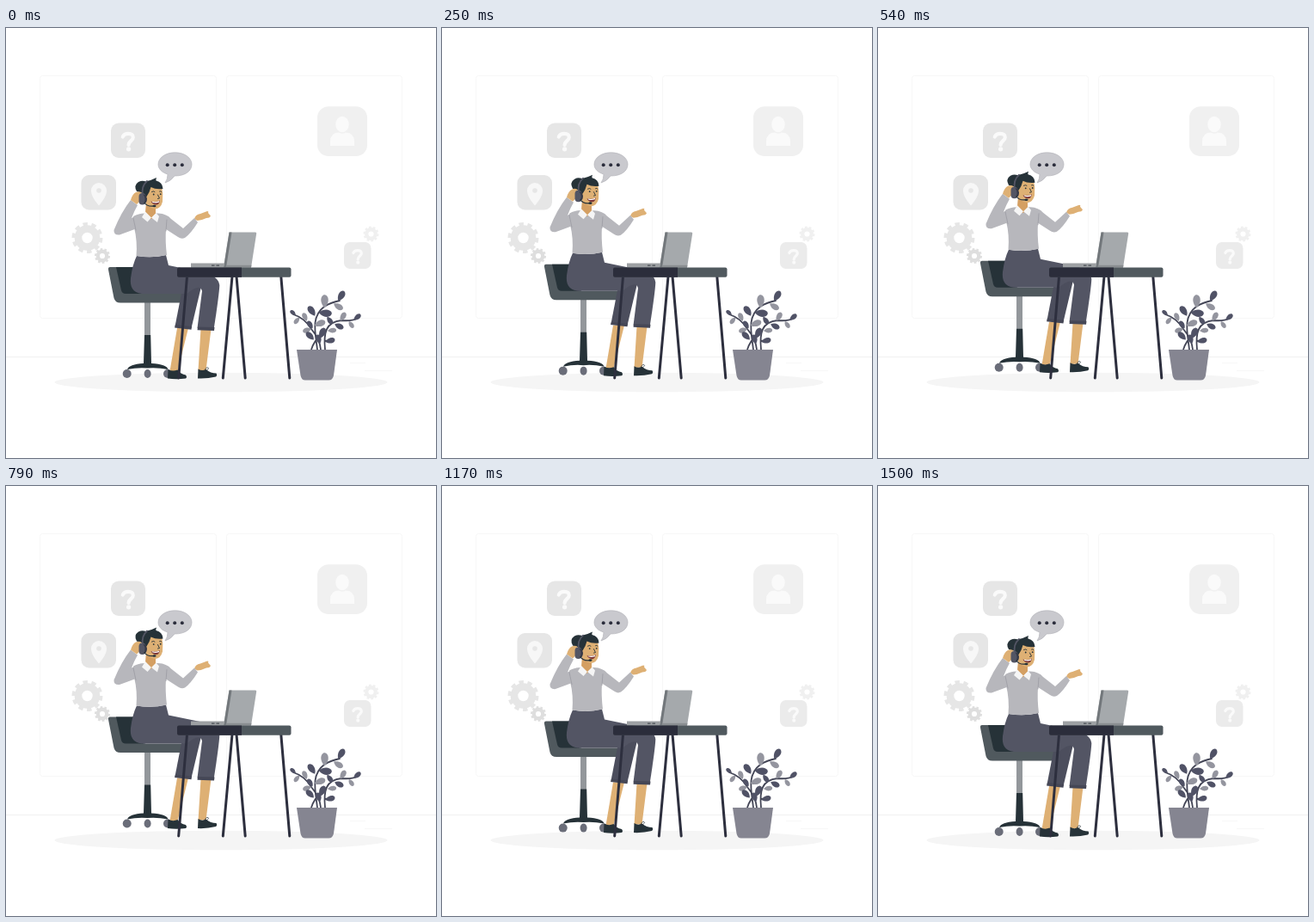
Animation, 500 px wide and 500 px high, one loop 1540 ms. Source, as an HTML page:

```html
<!DOCTYPE html>
<html lang="en">
<head>
<meta charset="utf-8">
<title>Support desk</title>
<style>
  html, body { margin: 0; width: 100%; height: 100%; overflow: hidden; background: #fff; }
  svg { display: block; width: 100vw; height: 100vh; }
  .line { fill: none; stroke-linecap: round; stroke-linejoin: round; }
</style>
</head>
<body>
<svg viewBox="0 0 500 500">
  <defs>
    <g id="question" fill="#fafafa">
      <path class="line" stroke="#fafafa" stroke-width="4.2" stroke-linecap="butt" d="M-6-4.5Q-4.5-8.2 .3-8.2Q6-8.2 6-3.7C6 0 .8.5.8 5"/>
      <circle cx=".8" cy="9.8" r="2.6"/>
    </g>
    <g id="gear" fill="none" stroke="currentColor">
      <circle r="10.5" stroke-width="8.6"/>
      <circle r="15.7" stroke-width="4.6" pathLength="100" stroke-dasharray="5.4 4.6"/>
    </g>
  </defs>

  <!-- room -->
  <g fill="none" stroke="#f7f7f7">
    <rect x="39.5" y="55.5" width="205" height="282" rx="3"/>
    <rect x="256.5" y="55.5" width="204" height="282" rx="3"/>
    <path stroke="#f1f1f1" d="M0 382.5H500"/>
    <path d="M400 389.5h18M417 398.5h32"/>
  </g>
  <ellipse cx="250" cy="412" rx="193.5" ry="11.3" fill="#f5f5f5"/>

  <!-- floating icons -->
  <rect x="122" y="110.5" width="40" height="40.5" rx="9" fill="#e6e6e6"/>
  <use href="#question" x="141.8" y="131"/>
  <rect x="393" y="249" width="31.5" height="31" rx="7" fill="#ebebeb"/>
  <use href="#question" transform="translate(408.6 265) scale(.78)"/>
  <rect x="362" y="91.3" width="58" height="57.7" rx="13" fill="#f0f0f0"/>
  <g fill="#fafafa">
    <ellipse cx="391" cy="112" rx="7.7" ry="9.3"/>
    <path d="M377 137v-5Q377 122 387 121.500Q391 124 395 121.500Q405 122 405 132v5Z"/>
  </g>
  <rect x="87.500" y="171" width="40.500" height="40.500" rx="9" fill="#e6e6e6"/>
  <path d="M108 206.500C103.500 201 99 195 99 189A9 9 0 0 1 117 189C117 195 112.500 201 108 206.500Z" fill="#f7f7f7"/>
  <circle cx="108" cy="189" r="2.800" fill="#e6e6e6"/>
  <use href="#gear" x="94.500" y="244" color="#e6e6e6"/>
  <use href="#gear" transform="translate(112 265) scale(.5)" color="#dedede"/>
  <use href="#gear" transform="translate(424.500 239.500) scale(.5)" color="#f0f0f0"/>

  <!-- speech bubble -->
  <path d="M188 170Q188 176 185 180Q192 178 196 172C209 172 216 166 216 158.500C216 151 207.500 144.800 196.500 144.800C185.500 144.800 177 151 177 158.500C177 163.500 181 168 188 170Z" fill="#c9c9ce" stroke="#b5b5ba" stroke-width=".7"/>
  <g fill="#2b2d3c"><circle cx="187.700" cy="159.300" r="2"/><circle cx="196.200" cy="159.300" r="2"/><circle cx="204.800" cy="159.300" r="2"/></g>

  <g id="sitter">
    <!-- chair -->
    <path d="M161 318h7v42h-7Z" fill="#93979b"/>
    <g fill="#6a6d79"><circle cx="140.700" cy="402" r="5"/><ellipse cx="164.600" cy="402" rx="4" ry="5"/><circle cx="188" cy="402" r="5"/></g>
    <path d="M161 357h7.200l.8 33Q187 391 188.500 397Q176 394.500 164.500 395.500Q153 394.500 141 397Q143 391 160 390Z" fill="#263238"/>
    <path d="M121 278H150L160 309H204V319.500H133Q127 319.500 125.500 314L119 281Q118.500 278 121 278Z" fill="#50595e"/>
    <path d="M128 278H154L162 309H139Q135 309 134 305Z" fill="#263238"/>

    <!-- legs -->
    <g fill="#deb074">
      <path d="M199 349H212L199.500 399H190.500Z"/>
      <path d="M226.500 350H238.500L232.500 398H223.500Z"/>
    </g>
    <g fill="#263238">
      <path d="M188.500 397Q194 400 199.500 397.500Q203 402.500 209 403.500Q211 406 209 407.500Q198 409 188 407.500Z"/>
      <path d="M223.500 396.500Q228 399.500 232.500 397Q238 401.500 244.500 401.500Q246 404 244 405.500Q234 408 223 407.500Z"/>
      <path class="line" stroke="#263238" stroke-width=".7" d="M231 399Q232 394 235 395Q237 396 232 399"/>
    </g>
    <path d="M208 288H230L215.500 349L196.500 347Z" fill="#4c4e5d"/>
    <path d="M152 265Q170 268 186 264L189 276L228 284Q247 288 248.300 299Q248 309 241.500 351L222.500 349L228 306Q226 296 210 309H158C147 308 144 300 145 291Q147 275 152 265Z" fill="#535564"/>
    <path d="M197 345l19 2-.5 3.700-19.500-2.300ZM223 347.500l19.500.5-.5 4-19.500-.8Z" fill="#454756"/>

    <!-- back arm, torso and front arm -->
    <path d="M145 200L153 206Q149 213 146 221L157 216L155 232Q139 238 132 240.500Q125 241 125.500 235Q134 214 145 200Z" fill="#b7b7bc"/>
    <path d="M219 222Q220 217 226 216L234 213Q236 213 235 215L238 218.500Q237 221 233 221Q228 223.500 222.500 224Z" fill="#deb074"/>
    <path d="M148 219Q155 215 163 215.500H177Q187 216 192 222L206 233L219 221L223 226Q215 239 208 244Q204 246 200 243L186 234Q185 248 187 264Q169 268 151.500 265Q153 248 149 232Z" fill="#b7b7bc"/>
    <path class="line" stroke="#9b9ba2" stroke-width=".8" d="M148 221L151 235M187 223L186 236"/>

    <!-- neck, collar and head -->
    <path d="M163 203H174V216Q171 223 167 222Q162 220 162 214Z" fill="#d49f62"/>
    <path d="M162 213.500L158 220L164.500 225.500L169 220.500L176 226L178 219L174.500 215L169 220.500Z" fill="#f5f5f5"/>
    <path d="M152 190Q148 183 154 179Q160 176 165 180L162 193Z" fill="#263238"/>
    <path d="M162 184H181Q183 193 182 202Q180 210 173.500 210.500Q164 209 161 200Z" fill="#deb074"/>
    <path d="M159 196Q155 184 164 178Q169 177 175 174Q174 176.500 174.500 177.500Q182 179 182.500 187Q174 188 168.500 185Q167 191 163.500 196Z" fill="#263238"/>
    <path class="line" stroke="#263238" stroke-width=".9" d="M169.500 190.500Q171.500 189 173 190.500M178.500 190Q180 189 181 190.500M176.500 194L178.500 198L176.500 198.500"/>
    <g fill="#263238"><circle cx="171.700" cy="193.500" r=".9"/><circle cx="179.700" cy="193.200" r=".9"/></g>
    <path d="M168.500 201.500Q174 203 179 200.500Q178 206 174 205.500Q170 205 168.500 201.500Z" fill="#7c3535"/>
    <path d="M169.500 201.800Q174 203 178.500 200.900L177.800 202.700Q174 204 170.500 203Z" fill="#fff"/>

    <!-- headset and raised hand -->
    <path class="line" stroke="#535564" stroke-width="1.800" d="M159 195Q157 184 164 178"/>
    <path d="M145 200Q147 193 151 191Q156 189 158 192L156 196L158 199L152 205Z" fill="#deb074"/>
    <rect x="154.500" y="192" width="8" height="13.500" rx="4" fill="#535564"/>
    <path d="M159.500 193.500q4 5 .5 11q4-.5 4-6q-1-5-4.500-5Z" fill="#353846"/>
    <path class="line" stroke="#263238" stroke-width="1.200" d="M161 203Q164 208 172 207"/>
    <ellipse cx="172.500" cy="207" rx="2" ry="1.300" fill="#263238"/>
  </g>

  <!-- laptop -->
  <path d="M259.500 237.500H290Q291.500 237.500 291.200 239L285 278.500H253Z" fill="#a5a9ac"/>
  <path d="M259.500 237.500H262.500L256 278.500H253Z" fill="#72777b"/>
  <path d="M256 275.800H285.400L285 278.700H255.500Z" fill="#8a8e91"/>
  <path d="M215 273.500H254L253 278.700H215Z" fill="#9da0a3"/>
  <path d="M239 275.500h3.500v1.300H239ZM244.500 275.500h3.500v1.300h-3.500Z" fill="#4a4e55"/>

  <!-- table -->
  <path class="line" stroke="#2d2f3e" stroke-width="3" d="M210.500 289L200.700 407M263 289L252.300 407M268 289L278.200 407M319.800 289L329.800 407"/>
  <rect x="199" y="278.500" width="132.500" height="11.200" rx="2" fill="#50595e"/>
  <path d="M201 278.500H274V289.700H201Q199 289.700 199 287.700V280.500Q199 278.500 201 278.500Z" fill="#2b2d3b"/>

  <!-- plant -->
  <path class="line" stroke="#434556" stroke-width="1.800" d="M362 374C360 355 354 336 370 324Q378 319 388 317M371 374C369 354 372 342 390 340Q402 341 408 338M366 374Q365 362 355 350Q347 337 334 333M355 374Q358 364 366 357M371 364L379 363M362 346L365 342"/>
  <g id="leaves"></g>
  <path d="M338 374H385L381 404Q380 409.500 375 409.500H348Q343.500 409.500 342.500 404Z" fill="#858591"/>
</svg>
<script>
  // Each leaf: centre x, centre y, angle in degrees, length.
  const drawLeaves = (color, leaves) => leaves.map(([x, y, angle, size]) =>
    `<path fill="${color}" transform="translate(${x} ${y}) rotate(${angle}) scale(${size / 10})"
      d="M-5 0C-2-3.500 3-4.500 5-1.500C6 2 0 4.500-5 0Z"/>`).join("");

  document.getElementById("leaves").innerHTML =
    drawLeaves("#94959f", [
      [371, 318, -85, 15], [386, 324, 35, 12], [392, 336, -55, 11], [401, 345, 60, 9],
      [338, 340, 135, 9], [348, 336, -110, 10], [365, 344, -15, 13], [379, 352, 0, 10], [350, 351, 165, 10]
    ]) +
    drawLeaves("#505266", [
      [390, 312, -55, 13], [356, 329, -120, 13], [371, 332, 10, 15], [376, 340, 60, 10],
      [387, 347, 30, 11], [408.500, 336.500, -35, 10], [334, 331, -135, 8],
      [354, 345, -120, 10], [368, 355, -60, 13], [354, 358, -130, 12], [377, 364, -10, 11], [364, 362, -100, 11]
    ]);

  const LOOP = 1540, FLOAT = 1500, RISE = 10;
  const sitter = document.getElementById("sitter");
  const start = performance.now();

  function draw(now) {
    const time = Math.max(0, now - start) % LOOP;
    const lift = RISE * Math.max(0, 1 - Math.abs(2 * time / FLOAT - 1));
    sitter.setAttribute("transform", `translate(0 ${-lift})`);
    requestAnimationFrame(draw);
  }
  draw(start);
</script>
</body>
</html>
```
